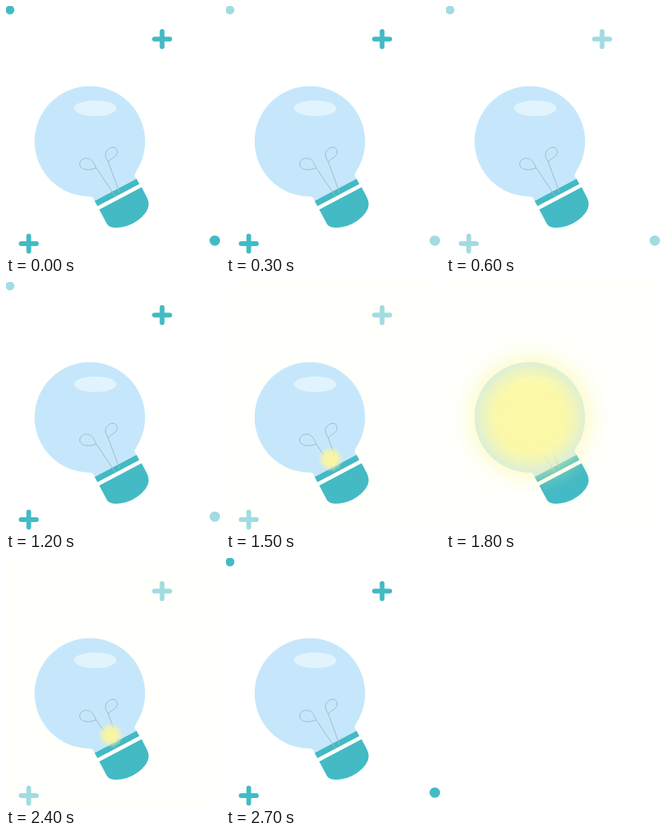
Animation of 268x311 px, one loop 3 s. Source, as an HTML page:

```html
<!DOCTYPE html>
<html lang="en">
<head>
<meta charset="utf-8">
<title>Light bulb</title>
<style>
  html, body { margin: 0; width: 100%; height: 100%; overflow: hidden; background: #fff; }
  svg { display: block; width: 268px; height: 311px; }
  .teal { fill: #43bac4; }
  .plus { fill: none; stroke: #43bac4; stroke-width: 6; stroke-linecap: round; }
  .glass { fill: #c6e7fb; }
  .wire { fill: none; stroke: #9dbccd; stroke-width: 1; }
</style>
</head>
<body>
<svg viewBox="0 0 268 311">
  <defs>
    <radialGradient id="spark">
      <stop offset="0" stop-color="#f8f5a3"/>
      <stop offset=".5" stop-color="#f8f5a3" stop-opacity=".95"/>
      <stop offset=".75" stop-color="#f8f5a3" stop-opacity=".45"/>
      <stop offset="1" stop-color="#f8f5a3" stop-opacity="0"/>
    </radialGradient>
    <radialGradient id="shine">
      <stop offset="0" stop-color="#fcf9a7"/>
      <stop offset=".44" stop-color="#fcf9a7" stop-opacity=".98"/>
      <stop offset=".58" stop-color="#fcf9a7" stop-opacity=".76"/>
      <stop offset=".72" stop-color="#fcf9a7" stop-opacity=".42"/>
      <stop offset=".86" stop-color="#fcf9a7" stop-opacity=".13"/>
      <stop offset="1" stop-color="#fcf9a7" stop-opacity="0"/>
    </radialGradient>
  </defs>

  <rect id="tint" width="268" height="311" fill="#fffffc"/>

  <g id="dots" class="teal">
    <circle cx="5" cy="5" r="5.5"/>
    <circle cx="261.5" cy="294.2" r="6.5"/>
  </g>
  <g id="pluses" class="plus">
    <path d="M186 41.5h19M195.5 32v19"/>
    <path d="M19 298h19M28.5 288.5v19"/>
  </g>

  <g class="glass">
    <circle cx="105" cy="169.7" r="69.2"/>
    <path d="M100 238.6Q107.5 238.5 109 240.5L111.5 245L163.5 217.5L161.5 213.5Q160 211 166 202L140 170Z"/>
  </g>
  <ellipse cx="111.7" cy="128.3" rx="26.5" ry="9.8" fill="#e1f4fe"/>
  <g class="teal">
    <path d="M111 244.5L163.5 216.8L167 223.3L114.5 251Z"/>
    <path d="M116.8 255.2L169.8 227.2L176.5 240Q181.5 250 175 259Q166 271 151 276Q132 281 126.5 273.5Z"/>
  </g>
  <g class="wire">
    <path d="M136.5 238L113 203C105 206.5 94 206.5 92.3 199C92 190 104 188.5 108.5 194.5C110.5 197 111 200 113 203"/>
    <path d="M142 233.5L128 195.5C124 189 123 184 127.5 180C132 175.5 139 176.5 139.3 183C139 189.5 132 190.5 128 195.5"/>
  </g>

  <circle id="small" cx="131" cy="222" r="16" fill="url(#spark)"/>
  <circle id="large" cx="106" cy="169.5" r="97" fill="url(#shine)"/>
</svg>
<script>
  const LOOP = 3000;

  // Each step is [start in ms, opacity], held until the next step.
  const steps = {
    dots:   [[0, 1], [300, .5], [1500, 0], [2700, 1]],
    pluses: [[0, 1], [600, .5], [1200, 1], [1500, .5], [1800, 0], [2400, .5], [2700, 1]],
    tint:   [[0, 0], [1500, 1], [2700, 0]],
    small:  [[0, 0], [1500, 1], [1800, 0], [2400, 1], [2700, 0]],
    large:  [[0, 0], [1800, 1], [2400, 0]],
  };

  for (const [id, table] of Object.entries(steps)) {
    const frames = table.map(([time, opacity]) =>
      ({ offset: time / LOOP, opacity, easing: 'steps(1, end)' }));
    frames.push({ offset: 1, opacity: table[0][1] });
    const animation = document.getElementById(id)
      .animate(frames, { duration: LOOP, iterations: Infinity });
    animation.startTime = 0;
  }
</script>
</body>
</html>
```
